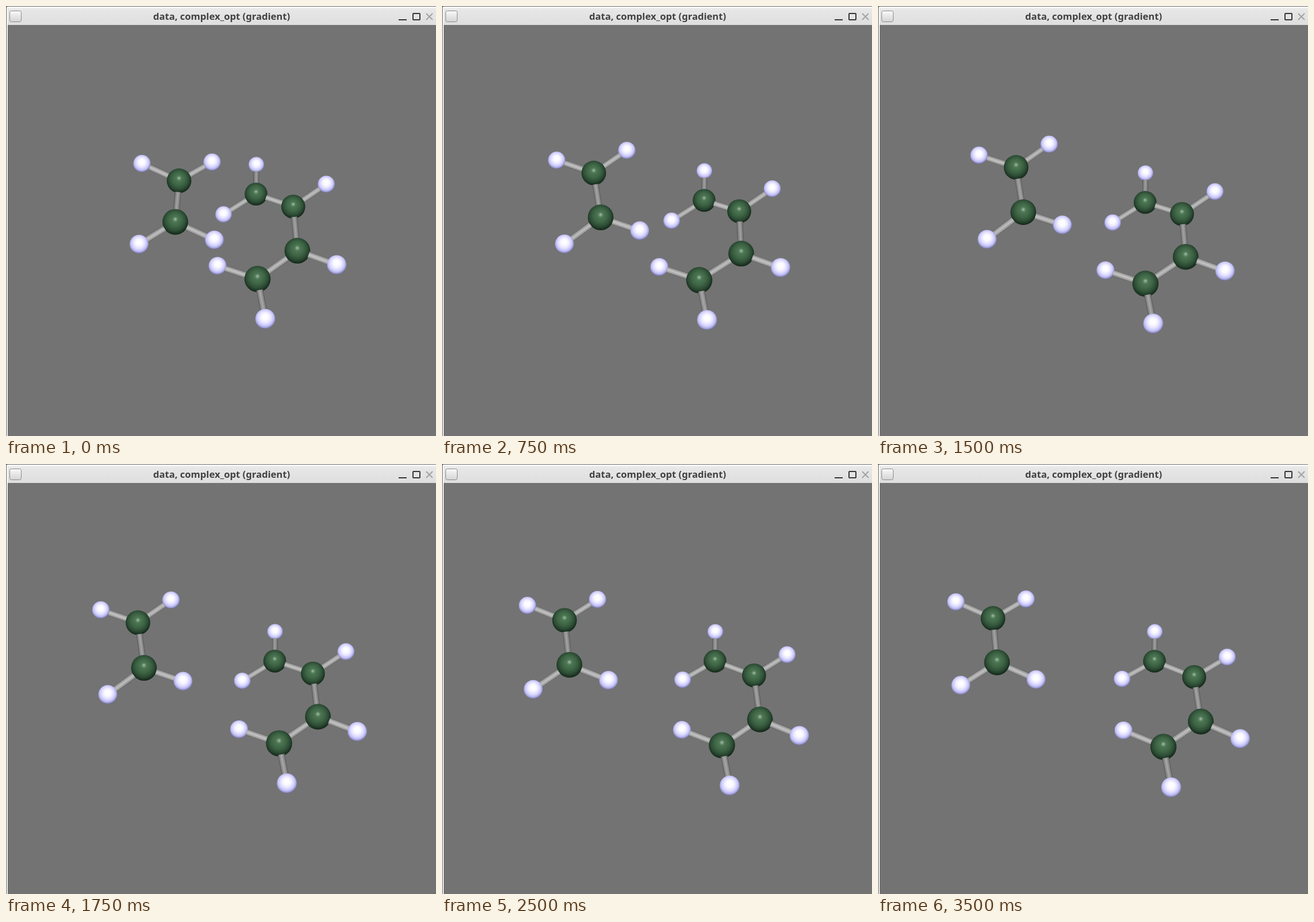
Recreate the animation shown at these times as an HTML page with a canvas. Size 748 px wide and 748 px high, loop 3750 ms.

```html
<!DOCTYPE html>
<html lang="en">
<head>
<meta charset="utf-8">
<title>Molecule viewer</title>
<style>
  html, body { margin: 0; width: 100%; height: 100%; overflow: hidden; background: #737373; }
  canvas { display: block; }
</style>
</head>
<body>
<canvas id="stage" width="748" height="748"></canvas>
<script>
const ctx = document.getElementById('stage').getContext('2d');
const STEP = 250;
const STEPS = 15;
const REST = 13;                // the molecules have settled here
const KEYS = [0, 3, 5, 7];      // after the last key the offset fades out quadratically

// Carbon chains in the settled pose, each carbon with its hydrogens.
// Poses are offsets from it, one per key: shift x, y, extra x, y at the chain's end, tilt.
const ethylene = {
  center: [204, 307], size: 21.9, slope: [0, .013],
  chain: [
    { at: [200, 268.5], hydrogens: [[135.5, 240], [257.5, 235]] },
    { at: [207, 345], hydrogens: [[144, 385], [275, 375]] }
  ],
  poses: [[101, 35.5, -13.5, -5, .02], [64, 21.5, 5, 1.5, -.1], [51, 16.5, 7.5, 1.5, -.13], [29.5, 7, 3.5, 3, -.1]]
};
const butadiene = {
  center: [520, 400], size: 21.2, slope: [.007, .019],
  chain: [
    { at: [481, 343], hydrogens: [[481.5, 292], [424.5, 374]] },
    { at: [550, 370.5], hydrogens: [[607.5, 336]] },
    { at: [561.5, 448], hydrogens: [[630, 478]] },
    { at: [496.5, 492], hydrogens: [[427, 463.5], [510, 562.5]] }
  ],
  poses: [[-46, -19, -13, 0, -.08], [-25, -8, -24, -9, -.08], [-19, -6, -22, -8, -.09], [-13.5, -2.5, -8, -5, -.06]]
};

const shading = {
  C: [[0, '#b4c9b6'], [.07, '#7f9f83'], [.2, '#4c7653'], [.5, '#3e6545'], [.75, '#2e4e36'], [.92, '#1d3523'], [1, '#14271a']],
  H: [[0, '#ffffff'], [.3, '#fbfaff'], [.55, '#e5e3ff'], [.77, '#c6c4fa'], [.92, '#9c9bd2'], [1, '#706f98']]
};

function build({ center, size, slope, chain, poses }) {
  const atoms = [];
  const add = (element, [x, y], along) => {
    const atom = { element, along, home: [x, y], side: x - center[0], links: [] };
    atom.size = size + slope[0] * atom.side + slope[1] * (y - center[1]);
    atom.r = atom.size * (element === 'C' ? 1 : .715);
    atoms.push(atom);
    return atom;
  };
  const bond = (a, b) => a.size < b.size ? b.links.push(a) : a.links.push(b);
  let previous;
  chain.forEach(({ at, hydrogens }, i) => {
    const along = i / (chain.length - 1);
    const carbon = add('C', at, along);
    if (previous) bond(previous, carbon);
    hydrogens.forEach(place => bond(carbon, add('H', place, along)));
    previous = carbon;
  });
  atoms.sort((a, b) => a.size - b.size);
  return { atoms, poses };
}
const molecules = [ethylene, butadiene].map(build);

function poseAt(poses, frame) {
  const last = KEYS.length - 1;
  if (frame >= KEYS[last]) {
    const left = ((REST - frame) / (REST - KEYS[last])) ** 2;
    return poses[last].map(v => v * left);
  }
  const i = KEYS.findLastIndex(key => key <= frame);
  const t = (frame - KEYS[i]) / (KEYS[i + 1] - KEYS[i]);
  return poses[i].map((v, n) => v + (poses[i + 1][n] - v) * t);
}

function moveAtom(atom, [x, y, endX, endY, tilt]) {
  atom.x = atom.home[0] + x + endX * atom.along;
  atom.y = atom.home[1] + y + endY * atom.along + tilt * atom.side;
}

function fillStops(gradient, stops) {
  for (const [at, color] of stops) gradient.addColorStop(at, color);
  return gradient;
}

function drawBond(far, near) {
  const dx = near.x - far.x, dy = near.y - far.y;
  const length = Math.hypot(dx, dy);
  const start = far.r * length / Math.hypot(length, 30 * (near.size - far.size));
  const half = (far.size + near.size) / 8;
  const peak = 160 + 40 * Math.abs(dx) / length;
  const gray = k => `rgb(${Array(3).fill(Math.round(peak * k))})`;
  ctx.save();
  ctx.translate(far.x, far.y);
  ctx.rotate(Math.atan2(dy, dx));
  ctx.fillStyle = fillStops(ctx.createLinearGradient(0, -half, 0, half), [
    [0, gray(.48)], [.15, gray(.78)], [.5, gray(1)], [.85, gray(.78)], [1, gray(.48)]
  ]);
  ctx.fillRect(start, -half, length - start, half * 2);
  ctx.restore();
}

function drawAtom({ x, y, r, element }) {
  const shine = ctx.createRadialGradient(x, y - r * .22, 0, x - r * .03, y - r * .1, r * 1.08);
  ctx.fillStyle = fillStops(shine, shading[element]);
  ctx.beginPath();
  ctx.arc(x, y, r, 0, Math.PI * 2);
  ctx.fill();
}

function drawWindow() {
  const rect = (color, ...box) => { ctx.fillStyle = color; ctx.fillRect(...box); };
  rect('#737373', 0, 0, 748, 748);
  const bar = ctx.createLinearGradient(0, 2, 0, 33);
  rect(fillStops(bar, [[0, '#f4f4f4'], [.15, '#e7e7e7'], [1, '#dedede']]), 1, 2, 747, 31);
  rect('#686868', 0, 0, 748, 1);
  rect('#ffffff', 2, 1, 746, 2);
  rect('#686868', 0, 1, 1, 747);
  rect('#f4f4f4', 1, 3, 2, 745);

  const icon = ctx.createLinearGradient(0, 8, 0, 28);
  ctx.fillStyle = fillStops(icon, [[0, '#fafafa'], [1, '#d2d2d2']]);
  ctx.strokeStyle = '#8b8b8b';
  ctx.lineWidth = 1;
  ctx.beginPath();
  ctx.roundRect(6.5, 8.5, 20, 19, 3);
  ctx.fill();
  ctx.stroke();

  ctx.fillStyle = '#414141';
  ctx.font = 'bold 16.6px "Noto Sans", "Open Sans", sans-serif';
  ctx.textAlign = 'center';
  ctx.fillText('data, complex_opt (gradient)', 375, 24);

  rect('#363636', 683, 23, 14, 2);
  ctx.strokeStyle = '#363636';
  ctx.lineWidth = 2;
  ctx.beginPath();
  ctx.roundRect(708, 13, 12, 11, 1);
  ctx.stroke();
  ctx.strokeStyle = '#a3a3a3';
  ctx.beginPath();
  ctx.moveTo(731, 13);
  ctx.lineTo(742, 24);
  ctx.moveTo(742, 13);
  ctx.lineTo(731, 24);
  ctx.stroke();
}

function render(now) {
  const step = Math.floor(now / STEP) % STEPS;
  const frame = step > KEYS.at(-1) ? step - 1 : step;  // the last key is held for two steps
  drawWindow();
  for (const { atoms, poses } of molecules) {
    const pose = poseAt(poses, frame);
    atoms.forEach(atom => moveAtom(atom, pose));
    for (const atom of atoms) {
      atom.links.forEach(far => drawBond(far, atom));
      drawAtom(atom);
    }
  }
}

const began = performance.now();
function tick() {
  render(performance.now() - began);
  requestAnimationFrame(tick);
}
tick();
</script>
</body>
</html>
```
